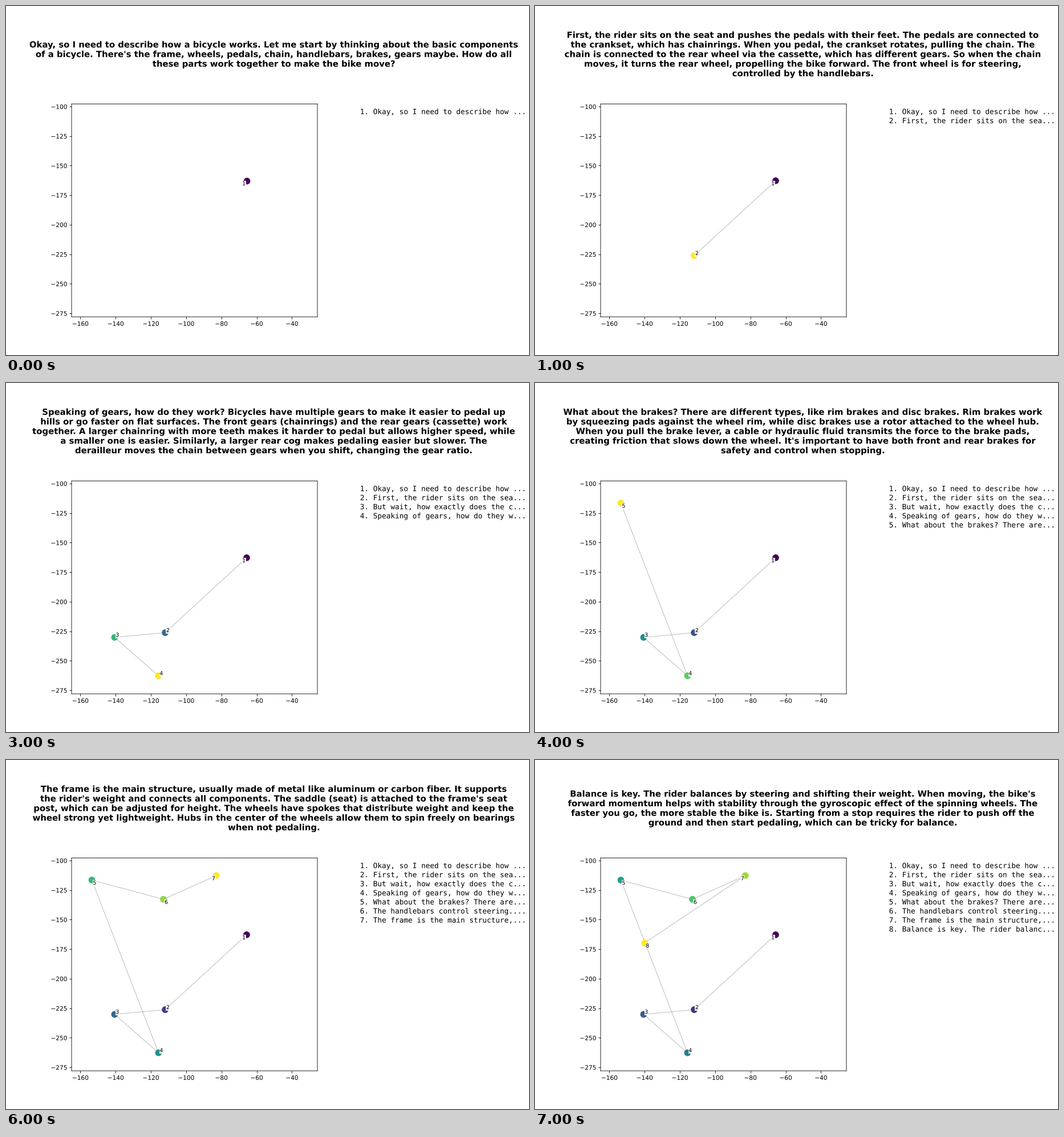
Animation of 917x611 px, one loop 8000 ms. Source, as a matplotlib script:

```python
import matplotlib.pyplot as plt
from matplotlib import patheffects
from matplotlib.animation import FuncAnimation

W, H, DPI = 917, 611, 76.4
LEFT, RIGHT, TOP, BOTTOM = 115.0, 546.0, 171.46, 544.17
WRAP, CLIP = 100, 32

# draw text as smooth outlines, free of pixel rounding
plt.rcParams["text.hinting"] = "none"
plt.rcParams["path.effects"] = [patheffects.Normal()]

THOUGHTS = [
    "Okay, so I need to describe how a bicycle works. Let me start by thinking "
    "about the basic components of a bicycle. There's the frame, wheels, pedals, "
    "chain, handlebars, brakes, gears maybe. How do all these parts work together "
    "to make the bike move?",
    "First, the rider sits on the seat and pushes the pedals with their feet. The "
    "pedals are connected to the crankset, which has chainrings. When you pedal, "
    "the crankset rotates, pulling the chain. The chain is connected to the rear "
    "wheel via the cassette, which has different gears. So when the chain moves, "
    "it turns the rear wheel, propelling the bike forward. The front wheel is for "
    "steering, controlled by the handlebars.",
    "But wait, how exactly does the chain transfer the motion? The chain is made "
    "of links that fit into the teeth of the chainrings and the cassette. So when "
    "the pedals turn the chainring, the chain moves, pulling the cassette and thus "
    "the rear wheel. That's the drivetrain, right? The drivetrain includes the "
    "pedals, crankset, chain, cassette, and derailleurs if there are gears.",
    "Speaking of gears, how do they work? Bicycles have multiple gears to make it "
    "easier to pedal up hills or go faster on flat surfaces. The front gears "
    "(chainrings) and the rear gears (cassette) work together. A larger chainring "
    "with more teeth makes it harder to pedal but allows higher speed, while a "
    "smaller one is easier. Similarly, a larger rear cog makes pedaling easier but "
    "slower. The derailleur moves the chain between gears when you shift, changing "
    "the gear ratio.",
    "What about the brakes? There are different types, like rim brakes and disc "
    "brakes. Rim brakes work by squeezing pads against the wheel rim, while disc "
    "brakes use a rotor attached to the wheel hub. When you pull the brake lever, "
    "a cable or hydraulic fluid transmits the force to the brake pads, creating "
    "friction that slows down the wheel. It's important to have both front and "
    "rear brakes for safety and control when stopping.",
    "The handlebars control steering. Turning the handlebars rotates the front "
    "wheel, changing the direction of the bike. The headset at the front of the "
    "frame allows the handlebars and fork to rotate smoothly. The fork holds the "
    "front wheel and connects it to the frame. The tires have treads for grip, and "
    "they're inflated with air to absorb shocks and maintain traction.",
    "The frame is the main structure, usually made of metal like aluminum or "
    "carbon fiber. It supports the rider's weight and connects all components. The "
    "saddle (seat) is attached to the frame's seat post, which can be adjusted for "
    "height. The wheels have spokes that distribute weight and keep the wheel "
    "strong yet lightweight. Hubs in the center of the wheels allow them to spin "
    "freely on bearings when not pedaling.",
    "Balance is key. The rider balances by steering and shifting their weight. "
    "When moving, the bike's forward momentum helps with stability through the "
    "gyroscopic effect of the spinning wheels. The faster you go, the more stable "
    "the bike is. Starting from a stop requires the rider to push off the ground "
    "and then start pedaling, which can be tricky for balance.",
]

# x, y, then the side of the label: right/left, up/down
POINTS = [
    (-65.7, -162.8, -1, -1), (-111.9, -226.2, 1, 1),
    (-140.6, -230.2, 1, 1), (-115.7, -262.7, 1, 1),
    (-153.5, -116.5, 1, -1), (-112.9, -132.8, 1, -1),
    (-82.9, -112.7, -1, -1), (-140.0, -169.7, 1, -1),
]
XY = [p[:2] for p in POINTS]


def wrap(text):
    lines = [""]
    for word in text.split():
        joined = (lines[-1] + " " + word).strip()
        if len(joined) <= WRAP:
            lines[-1] = joined
        else:
            lines.append(word)
    return lines


def pixel_text(x, y, text, **style):
    """Text with its baseline y pixels below the top of the stage."""
    return fig.text(x / W, 1 - y / H, text, va="baseline", **style)


# the tiny surplus keeps the pixel size from rounding down
fig = plt.figure(figsize=(W / DPI + 1e-6, H / DPI + 1e-6), dpi=DPI, facecolor="white")
ax = fig.add_axes([LEFT / W, 1 - BOTTOM / H, (RIGHT - LEFT) / W, (BOTTOM - TOP) / H])
ax.set_xlim(-164.98, -25.57)
ax.set_ylim(-277.98, -97.78)
for spine in ax.spines.values():
    spine.set_snap(False)

line, = ax.plot([], [], color="gray", alpha=0.5, lw=1, zorder=1)
dots = ax.scatter([], [], s=100, zorder=2)

labels, entries = [], []
for i, (x, y, side, up) in enumerate(POINTS):
    labels.append(ax.annotate(
        str(i + 1), (x, y), xytext=(4.9 * side, 4.6 * up - 3.5),
        textcoords="offset pixels", ha="center", va="baseline", fontsize=9, zorder=3,
        bbox=dict(facecolor="white", edgecolor="none", alpha=0.9, pad=0.5)))
    entries.append(pixel_text(
        620.7, 189.3 + 15.89 * i, f"{i + 1}. {THOUGHTS[i][:CLIP]}...",
        fontsize=12, family="DejaVu Sans Mono"))

title = [pixel_text(470, 0, "", ha="center", fontsize=14, weight="bold")
         for _ in range(5)]


def update(step):
    n = step + 1
    line.set_data(*zip(*XY[:n]))
    dots.set_offsets(XY[:n])
    dots.set_color([plt.cm.viridis(k / max(step, 1)) for k in range(n)])
    for k, (label, entry) in enumerate(zip(labels, entries)):
        label.set_visible(k < n)
        entry.set_visible(k < n)

    rows = wrap(THOUGHTS[step])
    for k, row in enumerate(title):
        row.set_text(rows[k] if k < len(rows) else "")
        row.set_y(1 - (89.4 + 16.81 * (k - (len(rows) - 1) / 2)) / H)
    return [line, dots, *labels, *entries, *title]


anim = FuncAnimation(fig, update, frames=len(THOUGHTS), interval=1000,
                     init_func=lambda: update(0), repeat=True, repeat_delay=0)
plt.show()
```
